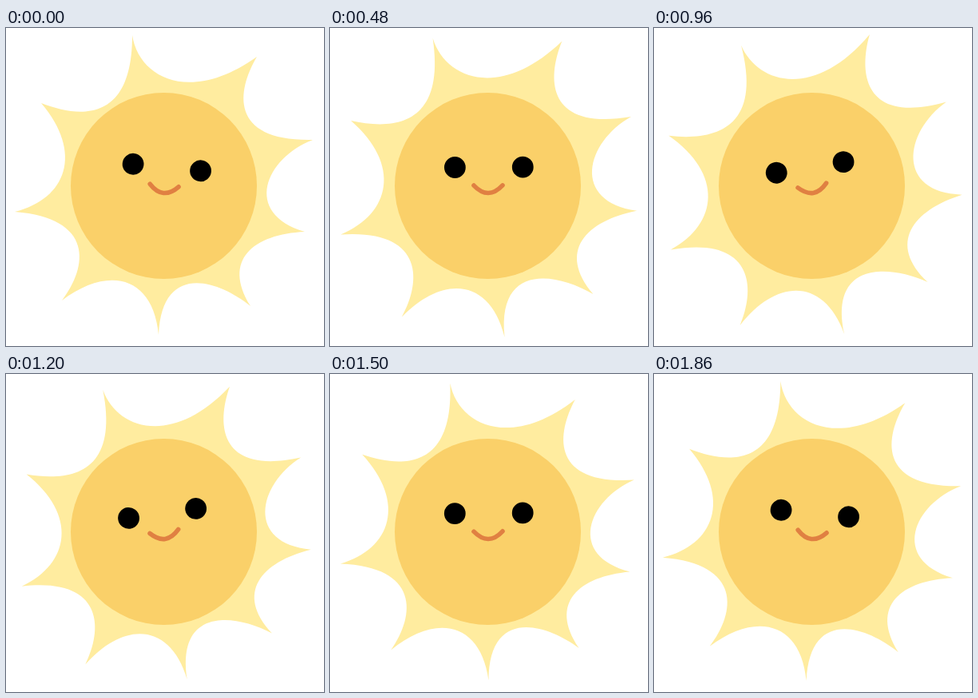
These frames come from a looping animation (398x398 px, 1.92 s). An HTML page:

```html
<!DOCTYPE html>
<html lang="en">
<head>
<meta charset="utf-8">
<title>Smiling sun</title>
<style>
  html, body { margin: 0; width: 100%; height: 100%; overflow: hidden; background: #fff; }
  svg { display: block; width: 100%; height: 100%; }
</style>
</head>
<body>
<svg viewBox="0 0 398 398">
  <path id="rays" fill="#ffec9f" d="M158 9
    C166 62 230 96 314 36
    C288 80 280 142 384 140
    C324 163 296 232 374 255
    C310 258 270 290 306 348
    C262 313 195 295 191 384
    C184 310 128 297 70 341
    C103 298 110 238 11 230
    C76 214 97 156 44 94
    C96 114 158 116 158 9Z"/>
  <circle cx="197.5" cy="197.5" r="116.5" fill="#fad069"/>
  <g id="face">
    <circle cx="156.5" cy="174.3" r="13.4"/>
    <circle cx="241.4" cy="174.3" r="13.4"/>
    <path d="M180 197 Q198 216 216 197" fill="none" stroke="#e08042" stroke-width="5.6" stroke-linecap="round"/>
  </g>
</svg>
<script>
  const LOOP = 1920, STEP = 60;

  // [time in ms, value]
  const tracks = {
    spin: [[0, 0], [240, -2.05], [480, -8.5], [720, -13.8], [910, -14.8], [1200, -11.2], [1500, -2.35], [1860, 0.1]],
    size: [[0, 1], [240, 1.007], [480, 1.022], [700, 1.031], [960, 1.02], [1200, 1.003], [1500, 0.9965], [1860, 1]],
    tilt: [[0, 5.75], [240, 4.4], [480, -0.3], [720, -5.8], [1000, -9.3], [1200, -8.1], [1500, -0.5], [1860, 5.75]]
  };

  // Key i of a looping track, for any integer i
  function key(track, i) {
    const n = track.length, turn = Math.floor(i / n);
    const [t, v] = track[i - turn * n];
    return [t + turn * LOOP, v];
  }

  function slope(track, i) {
    const [a, b] = [key(track, i), key(track, i + 1)];
    return (b[1] - a[1]) / (b[0] - a[0]);
  }

  // Flat at turning points, harmonic mean elsewhere
  function tangent(track, i) {
    const a = slope(track, i - 1), b = slope(track, i);
    return a * b <= 0 ? 0 : 2 * a * b / (a + b);
  }

  function sample(track, time) {
    let i = track.length - 1;
    while (track[i][0] > time) i--;
    const [t0, v0] = key(track, i), [t1, v1] = key(track, i + 1);
    const h = t1 - t0, u = (time - t0) / h, w = 1 - u;
    return v0 * w * w * (1 + 2 * u) + v1 * u * u * (1 + 2 * w)
      + h * u * w * (w * tangent(track, i) - u * tangent(track, i + 1));
  }

  const rays = document.getElementById('rays');
  const face = document.getElementById('face');
  const start = performance.now();

  function draw() {
    const time = Math.floor(((performance.now() - start) % LOOP) / STEP) * STEP;
    const at = name => sample(tracks[name], time).toFixed(4);
    rays.setAttribute('transform',
      `translate(197 201) rotate(${at('spin')}) scale(${at('size')}) translate(-197 -201)`);
    face.setAttribute('transform', `rotate(${at('tilt')} 198 198)`);
    requestAnimationFrame(draw);
  }
  draw();
</script>
</body>
</html>
```
